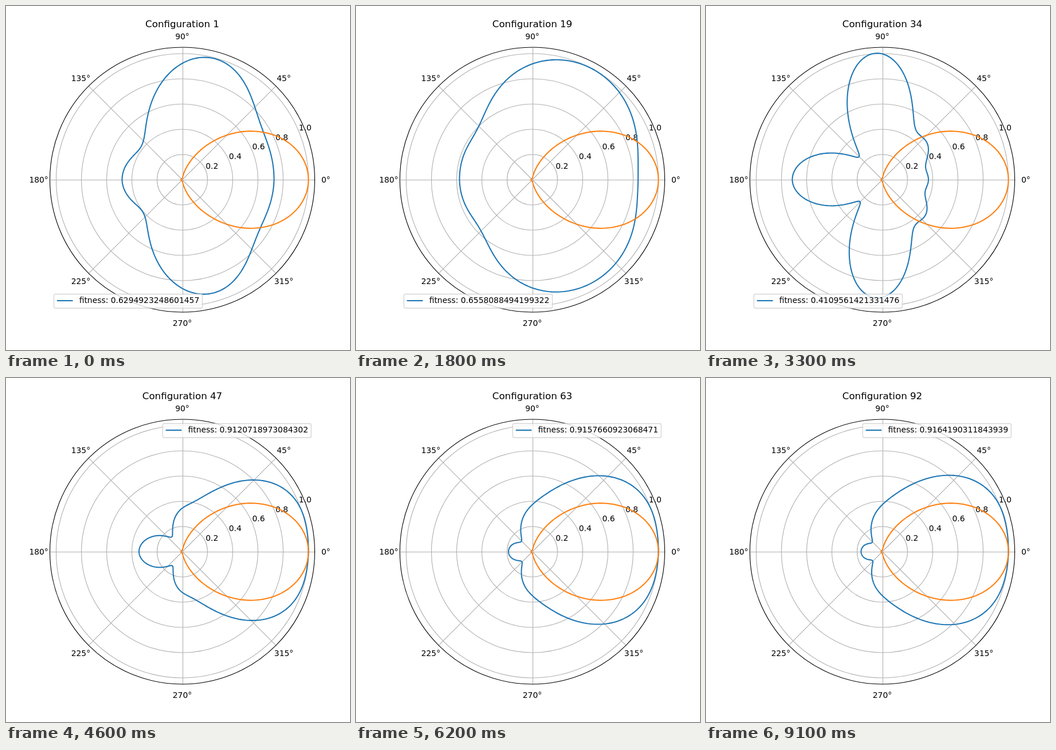
Recreate the animation shown at these times as an HTML page. Size 600x600 px, loop 9200 ms.

```html
<!DOCTYPE html>
<html lang="en">
<head>
<meta charset="utf-8">
<title>Radiation pattern</title>
<style>
  html, body { margin: 0; width: 100%; height: 100%; overflow: hidden; background: #fff; }
  svg { display: block; width: 600px; height: 600px; }
  text { font: 13.889px "DejaVu Sans", sans-serif; fill: #000; }
  #title { font-size: 16.667px; }
  .mid { text-anchor: middle; }
  .grid { fill: none; stroke: #b0b0b0; stroke-width: 1.11; }
  .curve { fill: none; stroke-width: 2.08; stroke-linejoin: round; }
</style>
</head>
<body>
<svg viewBox="0 0 600 600">
  <g id="grid" class="grid"></g>
  <g id="labels"></g>
  <path id="pattern" class="curve" stroke="#1f77b4"/>
  <path id="goal" class="curve" stroke="#ff7f0e"/>
  <circle cx="307.5" cy="303" r="231" fill="none" stroke="#000" stroke-width="1.11"/>
  <text id="title" class="mid" x="307.5" y="37"></text>
  <g id="legend">
    <rect x=".5" y=".5" width="259" height="24.5" rx="2.8" fill="#fff" stroke="#ccc" stroke-width="1.39" opacity=".8"/>
    <path class="curve" d="M5.8 12h27.8" stroke="#1f77b4"/>
    <text id="fitness" x="44.7" y="16"></text>
  </g>
</svg>
<script>
const CX = 307.5, CY = 303, UNIT = 220, RIM = 231, STEP = 100, COUNT = 92;
const $ = id => document.getElementById(id);
const rad = deg => deg * Math.PI / 180;
const lerp = (a, b, k) => a + (b - a) * k;
const snap = v => Math.floor(v + 0.5) + 0.5;
const polar = (r, deg, x = CX, y = CY) => [x + r * Math.cos(rad(deg)), y - r * Math.sin(rad(deg))];

// Key configurations: radius at nine even steps from 0° to 180°.
const keys = [
  { n: 1, fit: 0.6294923248601457, r: [160, 161.5, 179, 215, 203, 143, 96, 97, 105] },
  { n: 19, fit: 0.6558088494199322, r: [184.5, 197, 215, 219, 202, 165, 132, 127, 127] },
  { n: 34, fit: 0.4109561421331476, r: [80.5, 83, 102, 138, 219.5, 159, 57, 117, 157] },
  { n: 47, fit: 0.9120718973084302, r: [220, 218.5, 177, 107, 76, 44, 37.5, 63, 75.5] },
  { n: 63, fit: 0.9157660923068471, r: [220, 219, 186, 124, 82, 51, 26.5, 35.5, 41.5] },
  { n: 76, fit: 0.9723159581584462, r: [220, 206.5, 145, 68, 42.5, 9, 8, 26, 43.5] },
  { n: 92, fit: 0.9164190311843939, r: [220, 219.5, 187, 125, 82, 50, 24.5, 32, 37] }
];

// The power (radius squared) is a sum of cosines passing through the given radii.
function cosineSum(r) {
  const N = r.length - 1;
  const half = i => i % N ? 1 : 0.5;
  const coef = r.map((_, k) => 2 / N * half(k) *
    r.reduce((sum, v, j) => sum + half(j) * v * v * Math.cos(Math.PI * j * k / N), 0));
  return deg => Math.sqrt(Math.abs(
    coef.reduce((sum, c, k) => sum + c * Math.cos(k * rad(deg)), 0)));
}

// The lower half is slightly weaker than the upper one.
const tilt = deg => 1 - 0.066 * Math.max(0, -Math.sin(rad(deg))) ** 1.3;

function trace(radius) {
  let d = "";
  for (let a = 0; a < 360; a++) {
    d += (a ? "L" : "M") + polar(radius(a), a).map(v => v.toFixed(2)).join(" ");
  }
  return d + "Z";
}

function stateAt(n) {
  const i = keys.findIndex(key => key.n >= n), b = keys[i];
  if (b.n === n) return b;
  const a = keys[i - 1], k = (n - a.n) / (b.n - a.n);
  return { fit: lerp(a.fit, b.fit, k), r: a.r.map((v, j) => lerp(v, b.r[j], k)) };
}

function show(n) {
  const s = stateAt(n), radius = cosineSum(s.r);
  $("title").textContent = "Configuration " + n;
  $("fitness").textContent = "fitness: " + String(s.fit).slice(0, 18);
  $("pattern").setAttribute("d", trace(a => radius(a) * tilt(a)));
  $("legend").setAttribute("transform", n <= 40 ? "translate(83 502)" : "translate(272.8 79)");
}

function buildAxes() {
  let grid = "", labels = "";
  for (let a = 0; a < 360; a += 45) {
    const [cx, cy] = a % 90 ? [CX, CY] : [snap(CX), snap(CY)];
    const [x, y] = polar(RIM, a, cx, cy);
    grid += `<path d="M${cx} ${cy}L${x} ${y}"/>`;
    const [lx, ly] = polar(250.4, a);
    labels += `<text class="mid" x="${lx}" y="${Math.round(ly + 5)}">${a}°</text>`;
  }
  for (let i = 1; i <= 5; i++) {
    const r = i * UNIT / 5, [x, y] = polar(r, 22.5);
    grid += `<circle cx="${CX}" cy="${CY}" r="${r}"/>`;
    labels += `<text x="${x}" y="${Math.round(y - 2)}">${(i / 5).toFixed(1)}</text>`;
  }
  $("grid").innerHTML = grid;
  $("labels").innerHTML = labels;
  $("goal").setAttribute("d", trace(a => UNIT * Math.max(Math.max(Math.cos(rad(a)), 0) ** 2, 0.01)));
}

buildAxes();
const start = performance.now();
let shown = 0;
function tick(now) {
  const n = Math.floor(Math.max(0, now - start) / STEP) % COUNT + 1;
  if (n !== shown) show(shown = n);
  requestAnimationFrame(tick);
}
tick(start);
</script>
</body>
</html>
```
